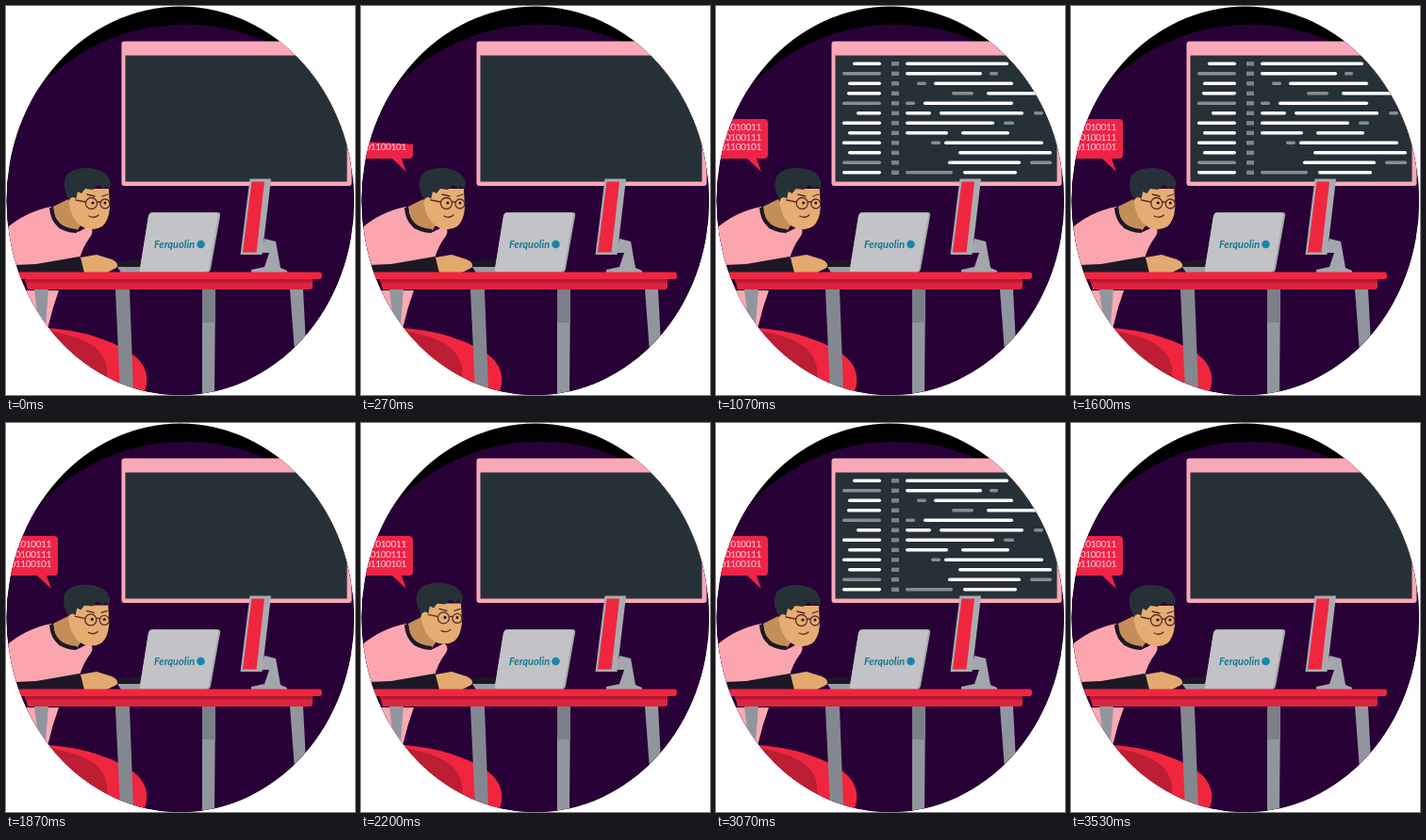
An HTML page for the animation above (3590 ms loop, 370 by 413 pixels).

```html
<!DOCTYPE html>
<html lang="en">
<head>
<meta charset="utf-8">
<title>Coding at the desk</title>
<style>
  html, body { margin: 0; width: 100%; height: 100%; overflow: hidden; background: #fff; }
  svg { display: block; width: 100vw; height: 100vh; }
  .bits { font: 10.3px Lato, sans-serif; letter-spacing: -.5px; fill: #ffd3da; text-anchor: end; }
  .brand { font: italic 700 11px Lato, sans-serif; fill: #16788f; }
</style>
</head>
<body>
<svg viewBox="0 0 370 413">
  <defs>
    <clipPath id="stage"><ellipse cx="184.800" cy="206.800" rx="184.200" ry="206.300"/></clipPath>
    <clipPath id="codeClip"><path id="codeWipe"/></clipPath>
    <clipPath id="bubbleClip"><path id="bubbleWipe"/></clipPath>
  </defs>
  <g clip-path="url(#stage)">
    <rect width="370" height="413"/>
    <ellipse cx="190" cy="225.500" rx="210" ry="206" fill="#280137"/>

    <!-- wall screen -->
    <rect x="122.500" y="37.500" width="244" height="153.500" rx="3" fill="#f9a8b7"/>
    <rect x="126.500" y="52.500" width="235" height="134" fill="#263137"/>
    <g clip-path="url(#codeClip)"><g id="code" stroke-width="3.400" stroke-linecap="round"/></g>

    <!-- speech bubble -->
    <g clip-path="url(#bubbleClip)">
      <g id="bubble">
        <path d="M-4 120H51Q55 120 55 124V158Q55 162 51 162H43L48 176L33 162H-4Z" fill="#ef2348"/>
        <g class="bits">
          <text x="48" y="132">01010011</text>
          <text x="48" y="142.500">10100111</text>
          <text x="48" y="153">01100101</text>
        </g>
      </g>
    </g>

    <!-- chair and table legs -->
    <path d="M18 302H56L50 320L44 343L25 325Z" fill="#fba9b2"/>
    <path d="M30 341Q75 343 100 353Q130 363 142 377Q151 388 149 402L146 413H40Z" fill="#f0263f"/>
    <path d="M44 345Q78 350 94 362Q110 375 107 398Q76 384 48 352Z" fill="#bd1e33"/>
    <g fill="#91969e">
      <path d="M30 301H45L42 338L34 332Z"/>
      <path d="M116 301H131L135 408H121Z" fill="#838890"/>
      <path d="M208 301H222L221 413H208Z"/>
      <path d="M301 301H315L318 360L306 368Z"/>
    </g>
    <path d="M208 301H222V336H208Z" fill="#7b8088"/>

    <!-- body -->
    <path d="M-4 240Q18 219 48 213L56 236L76 240L88 234Q95 238 88 247Q82 255 78 268L60 276L10 278L-4 258Z" fill="#fba5ae"/>
    <path d="M50 213L66 205L80 232L75 239Q58 238 52 226Z" fill="#c48e58"/>
    <path d="M48 214Q50 238 75 239" fill="none" stroke="#1c1826" stroke-width="4"/>
    <path d="M8 275L32 274L78 266L84 282L66 284H14Z" fill="#1c1826"/>
    <path d="M118 271L145 269V278H118Z" fill="#1c1826"/>
    <path d="M79 267L96 264L112 269Q121 273 117 278L107 283H83Z" fill="#e2aa6f"/>

    <!-- head -->
    <g id="head">
      <path d="M66 194H109L110 214Q109 228 102 234Q94 239 84 236Q73 232 68 216Z" fill="#e6ad72"/>
      <path d="M62 193Q60 176 76 173Q92 170 104 177L108 181L111 187L110 194L105 191L104 194L98 190L92 195L84 194L80 199L76 197L74 206L70 208Q64 204 62 193Z" fill="#263137"/>
      <ellipse cx="71" cy="209" rx="4.500" ry="6" fill="#e6ad72"/>
      <g fill="none" stroke="#5b2a2c" stroke-width="1.300" stroke-linecap="round">
        <circle cx="90.500" cy="209.500" r="6"/>
        <circle cx="105" cy="210" r="5"/>
        <path d="M74 206L84 208M97 208L100 208M86 200L94 202M102 202L108 200M88 223Q94 226 98 222"/>
      </g>
      <g fill="#21141d"><circle cx="92" cy="209" r="1.600"/><circle cx="105" cy="209" r="1.500"/></g>
    </g>

    <!-- laptop -->
    <path d="M118 277H150V283H122Z" fill="#999da4"/>
    <path d="M155 219H224Q228 219 227 223L217 279Q216 283 213 283H143Q141 283 142 279L151 223Q152 219 155 219Z" fill="#a7a9ae"/>
    <path d="M155 220H222Q226 220 225 223L215 279Q214 282 211 282H144Q141 282 142 279L151 223Q152 220 155 220Z" fill="#c2c3c6"/>
    <text class="brand" x="157" y="257">Ferquolin</text>
    <circle cx="206.500" cy="253" r="4.300" fill="#1687ad"/>

    <!-- desk monitor -->
    <path d="M270 262L274 247L286 250L291 278L298 281V283H260V280L274 277L279 262Z" fill="#a3a6ac"/>
    <path d="M258.500 183.500H281L271.500 264H248.500Z" fill="#a9abb0"/>
    <path d="M260.500 186.500H274L265.500 261.500H251Z" fill="#f0263f"/>

    <!-- table top -->
    <path d="M20 289H325V298Q325 301 322 301H23Z" fill="#dd2440"/>
    <path d="M20 289H325V293.500H20Z" fill="#b51a30"/>
    <rect x="11" y="282.500" width="324" height="7.500" rx="3" fill="#f0263f"/>
  </g>
</svg>
<script>
const LOOP = 3590, CYCLE = 1600;
const $ = id => document.getElementById(id);

// Each row: start of the left bar, then right-hand bars; "g" marks grey.
const rows = [
  "145 201-310", "g134 201-282 g290-299", "140 g213-223 231-315", "139 g250-273 287-342",
  "g134 g201-211 220-315", "149 201-228 237-326 g337-347", "134 201-295 g305-316",
  "140 201-246 260-311", "134 g228-238 242-347", "140 257-356",
  "g134 246-323 g333-356", "134 g201-251 262-319"
];
const bar = (a, b, y, grey) =>
  `<path d="M${a + 1.7} ${y}H${b - 1.7}" stroke="${grey ? "#868d92" : "#fff"}"/>`;
$("code").innerHTML = rows.map((row, i) => {
  const y = 61.3 + i * 10.5;
  const [left, ...rest] = row.split(" ");
  const num = s => +s.replace("g", "");
  return bar(num(left), 175, y, left[0] === "g") +
    `<rect x="186" y="${y - 2.2}" width="8" height="4.400" fill="#7d858b"/>` +
    rest.map(r => {
      const [a, b] = r.split("-").map(num);
      return bar(a, b, y, r[0] === "g");
    }).join("");
}).join("");

const ramp = (t, a, b) => Math.min(1, Math.max(0, (t - a) / (b - a)));
const smooth = u => u * u * (3 - 2 * u);

// Visible area below a slightly slanted edge.
const below = (x0, x1, y, bottom, tilt) =>
  `M${x0} ${y}L${x1} ${y + (x1 - x0) * tilt}V${bottom}H${x0}Z`;

function draw(t) {
  const c = t < 600 ? 0 : (t - 600) % CYCLE;
  const shown = ramp(c, 260, 470) - ramp(c, 1020, 1280);
  $("codeWipe").setAttribute("d", below(127, 362, 188 - shown * 144, 200, .05));
  const pop = smooth(ramp(t, 150, 400));
  $("bubbleWipe").setAttribute("d", below(-4, 60, 178 - pop * 72, 182, .05));
  const hop = Math.sin(Math.PI * ramp(c, 330, 470));
  $("bubble").setAttribute("transform", `translate(0 ${-5 * hop})`);
  const lean = smooth(ramp(t, 1750, 2150)) - smooth(ramp(t, 2250, 2800));
  const sway = Math.sin(Math.PI * ramp(t, 500, 1750)) * .8;
  $("head").setAttribute("transform", `translate(${sway - 3 * lean} ${-2.6 * lean})`);
}

const start = performance.now();
function tick() {
  draw((performance.now() - start) % LOOP);
  requestAnimationFrame(tick);
}
tick();
</script>
</body>
</html>
```
